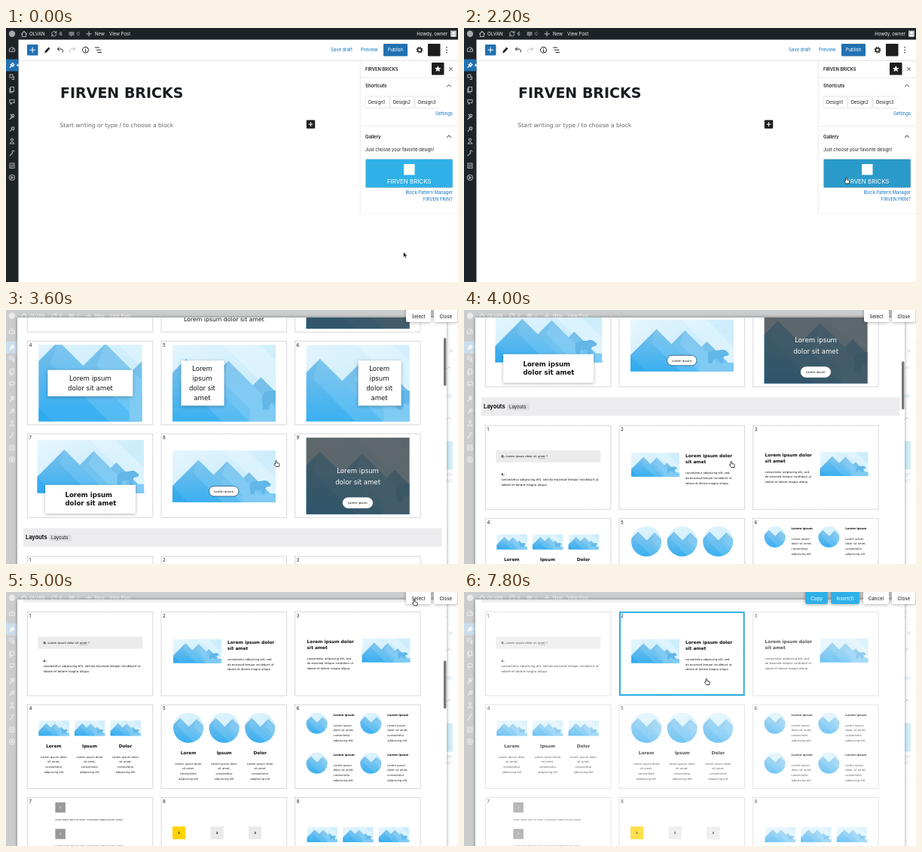
Write an HTML page that moves like this. It is 600 px wide and 338 px high and loops after 8 s.

```html
<!DOCTYPE html>
<html lang="en">
<head>
<meta charset="utf-8">
<title>Block gallery</title>
<style>
html, body { margin: 0; width: 100%; height: 100%; overflow: hidden; background: #fff; }
svg { display: block; }
#stage { width: 100%; height: 100%; }
text { font-family: Inter, sans-serif; white-space: pre; }
.v { font-family: "DejaVu Sans", sans-serif; }
.ic { fill: none; stroke: #1e1e1e; stroke-linecap: round; stroke-linejoin: round; }
.soft { filter: drop-shadow(0 1px 2px rgba(0,0,0,.3)); }
</style>
</head>
<body>
<svg id="stage" viewBox="0 0 600 338">
  <defs>
    <linearGradient id="sky" x1="0" y1="0" x2="1" y2="1">
      <stop offset="0" stop-color="#e6f6fe"/><stop offset=".5" stop-color="#cdedfc"/><stop offset="1" stop-color="#d4effc"/>
    </linearGradient>
    <linearGradient id="near" x1="0" y1="0" x2="0" y2="1">
      <stop offset="0" stop-color="#78bfe9"/><stop offset=".75" stop-color="#3bb0f2"/>
    </linearGradient>
    <linearGradient id="far" x1="0" y1="0" x2="0" y2="1">
      <stop offset="0" stop-color="#78bfe9"/><stop offset=".75" stop-color="#6cc6f6"/>
    </linearGradient>
    <g id="scene">
      <path d="M0 0H142V90H0z" fill="url(#sky)"/>
      <path d="M70 0H104L142 38V71z" fill="#fff" opacity=".25"/>
      <path d="M105 30L165 90H45z" fill="url(#far)"/>
      <path d="M75 15L150 90H0z" fill="url(#far)"/>
      <path d="M75 15L150 90H125L68 33z" fill="#9bd8f8" opacity=".35"/>
      <path d="M36 13L113 90H-41z" fill="url(#near)"/>
      <path d="M36 13L113 90H88L29 31z" fill="#8fd3f8" opacity=".3"/>
      <path d="M0 49L41 90H0z" fill="#1f9fe8" opacity=".35"/>
      <path d="M95 59H142V90H95z" fill="#7fcbf4"/>
      <path d="M107 60L106 51Q106 43 113 42.500L122 42Q127 40 130 42L135 46L134 49L129 50L127 53V60H123L122 54H114L112 60z" fill="#62b7e8"/>
    </g>
    <symbol id="art" viewBox="0 0 142 71" preserveAspectRatio="xMidYMid slice"><use href="#scene"/></symbol>
    <symbol id="close-up" viewBox="19.500 16 86 64" preserveAspectRatio="xMidYMid slice"><use href="#scene"/></symbol>
    <clipPath id="round"><circle cx="55.500" cy="35.500" r="35.500"/></clipPath>
    <symbol id="disc" viewBox="20 0 71 71"><use href="#scene" clip-path="url(#round)"/></symbol>
    <clipPath id="sheet"><path d="M15 10H585V338H15z"/></clipPath>
  </defs>
  <g id="page"></g>
  <g id="modal">
    <path d="M0 0H600V338H0z" fill="#fff" opacity=".77"/>
    <path d="M15 10H585V345H15z" fill="#fff" style="filter:drop-shadow(0 0 2px rgba(0,0,0,.4))"/>
    <g clip-path="url(#sheet)"><g id="list"></g></g>
    <rect id="thumb" x="581" width="3.4" height="64" rx="1.7" fill="#777"/>
    <g id="tools"></g>
  </g>
  <path id="arrow" d="M0 0V7.2L1.7 5.7L2.8 8.3L4.1 7.8L3 5.2H5.2z" fill="#111" stroke="#fff" stroke-width=".6"/>
  <path id="hand" d="M-1 4.300V.8a.85.85 0 0 1 1.700 0V2.900L3.400 3.600Q4.300 3.900 4.300 4.800L3.700 8H-.3L-2.700 4.800Q-2.500 3.600-1 4.400z" fill="#fff" stroke="#111" stroke-width=".8" stroke-linejoin="round"/>
</svg>
<script>
const LOOP = 8000;
const $ = id => document.getElementById(id);
const INK = '#1e1e1e', LINK = '#0a72c4', BLUE = '#2271b1', CYAN = '#2fb1e8';

// Markup helpers
const rect = (x, y, w, h, fill, more = '') =>
  `<rect x="${x}" y="${y}" width="${w}" height="${h}" fill="${fill}" ${more}/>`;
const text = (x, y, s, size, fill = INK, more = '') =>
  `<text x="${x}" y="${y}" font-size="${size}" fill="${fill}" ${more}>${s}</text>`;
const icon = (d, color = INK, w = 1) =>
  `<path class="ic" d="${d}" style="stroke:${color}" stroke-width="${w}"/>`;
const MID = 'text-anchor="middle"', END = 'text-anchor="end"';
const BOLD = 'font-weight="700"', SEMI = 'font-weight="600"', BOLD_MID = BOLD + ' ' + MID;
const verd = (x, y, s, size, fill = '#111', more = '') => text(x, y, s, size, fill, 'class="v" ' + more);
const lines = (x, y, step, rows, size, fill, more) =>
  rows.map((s, i) => verd(x, y + i * step, s, size, fill, more)).join('');
const art = (x, y, w, h, id = 'art') => `<use href="#${id}" x="${x}" y="${y}" width="${w}" height="${h}"/>`;

function buildPage() {
  const gray = '#a7aaad', light = '#f0f0f1';
  const side = [
    'M5 31.5a3.6 3.6 0 1 1 6 0zM8 30l1.5-2.5',
    'M5 62h4v4h-4zM8 68.5h2.5v-4', 'M6 78.5h4.5v6h-4.5zM5 80v6h4',
    'M5 95.5h6v4h-3l-1.5 2v-2H5z', 'M6 115l4 4M9 114.5l2 2l-3 3l-1.5-1.5zM5 121.5l2-2',
    'M5 137.5l3-3M7 133l3 3l1-3l-1.5-1.5z',
    'M6.5 148.5a1.5 1.5 0 1 1 3 0a1.5 1.5 0 1 1-3 0M5 154q3-5 6 0z',
    'M5 170l4-4M9 166a1.5 1.5 0 1 1 2-2', 'M5 180h6v6.5h-6zM7 182v3M9 181.5v3',
    'M4.5 199a3.5 3.5 0 1 1 7 0a3.5 3.5 0 1 1-7 0M7 197.5v3l2.5-1.5z'];
  const bar = rect(0, 0, 600, 15.5, '#1d2327') + rect(0, 15, 16.5, 323, '#1d2327')
    + rect(0, 41.5, 16.5, 16, BLUE) + '<path d="M16.5 47L14 49.5L16.5 52z" fill="#fff"/>'
    + '<circle cx="8" cy="7.8" r="4.2" fill="#a7aaad"/>'
    + icon('M20.5 8L24 4.5L27.5 8M21.5 7.5V11.5H26.5V7.5', gray, 1.1)
    + text(31, 10, 'OLVAN', 6.2, light)
    + icon('M60.5 7.5a3.3 3.3 0 0 1 6-1.5M67 8a3.3 3.3 0 0 1-6 1.5M66.8 4.5V6.5H65M60.8 11V9H62.5', gray)
    + text(71, 10, '6', 6, light)
    + '<path d="M83.5 5H90.5V10H88L86 12V10H83.5z" fill="#787c82"/>' + text(94, 10, '0', 6, gray)
    + icon('M107 7.8H113M110 4.8V10.8', gray, 1.2) + text(118, 10, 'New', 6, light)
    + text(137, 10, 'View Post', 6, light) + text(586, 10, 'Howdy, owner', 6, light, END)
    + rect(590, 3.5, 8, 8, '#c3c4c7') + '<circle cx="594" cy="6.5" r="1.7" fill="#fff"/><path d="M591 11.5q3-5 6 0z" fill="#fff"/>'
    + side.map(d => icon(d, gray, 1.1)).join('')
    + icon('M5 52.5L7 50.5M6 48.5L9 51.5M8.5 46.5L11 49L9 50.5L7.5 48.5z', '#fff', 1.1);

  const gear = '<circle cx="549" cy="29.3" r="2.5" fill="none" stroke="#1e1e1e" stroke-width="1.5"/>'
    + '<circle cx="549" cy="29.3" r="3.8" fill="none" stroke="#1e1e1e" stroke-width="1.2" stroke-dasharray="1.5 1.48"/>';
  const head = rect(16.5, 43, 583.5, .8, '#e0e0e0') + rect(28, 22, 14.5, 14.5, BLUE, 'rx="1"')
    + icon('M32 29.2H38.5M35.2 26V32.5', '#fff')
    + '<path d="M51 33.5L52 30.5L56.5 25.5L58.5 27.3L54 32.3z" fill="#1e1e1e"/>'
    + icon('M68.5 28H73a2.5 2.5 0 0 1 2 4M70.5 25.8L68.3 28L70.5 30.2')
    + icon('M91.5 28H87a2.5 2.5 0 0 0-2 4M89.5 25.8L91.7 28L89.5 30.2', '#bbb')
    + icon('M101.5 29.2a4 4 0 1 1 8 0a4 4 0 1 1-8 0M105.5 29V31.5M105.5 27V27.2')
    + icon('M118.5 26H123.5M120.5 29.2H126M122 32.5H126.5')
    + text(431, 31.4, 'Save draft', 6, LINK) + text(471, 31.4, 'Preview', 6, LINK)
    + rect(501, 21, 32, 16.5, BLUE, 'rx="1"') + text(517, 31.4, 'Publish', 6, '#fff', MID)
    + gear + rect(560, 21, 16.5, 16.5, INK, 'rx="1"')
    + [25.7, 29.2, 32.7].map(y => `<circle cx="585" cy="${y}" r=".8" fill="#1e1e1e"/>`).join('');

  const body = verd(72, 92.5, 'FIRVEN BRICKS', 19, '#191e23', BOLD)
    + verd(71.5, 131.7, 'Start writing or type / to choose a block', 7.6, '#666')
    + rect(398.8, 122.5, 11.4, 11.2, INK, 'rx="1"') + icon('M402 128.1H407M404.5 125.6V130.6', '#fff');

  const tab = (x, n, open) =>
    `<path d="M${x + 32} 91H${x + 2}Q${x} 91 ${x} 93V104.5Q${x} 106.5 ${x + 2} 106.5H${x + 32}${open ? '' : 'z'}" fill="none" stroke="#ddd" stroke-width=".7"/>`
    + text(x + 4, 101, 'Design' + n, 6);
  const panel = rect(469.8, 43.5, .7, 204, '#e2e2e2') + text(477, 56.7, 'FIRVEN BRICKS', 5.8, INK, SEMI)
    + rect(565, 46, 16.5, 16.5, INK, 'rx="1"')
    + '<path d="M573.3 50L574.5 52.9L577.6 53.1L575.2 55.1L576 58.2L573.3 56.5L570.6 58.2L571.4 55.1L569 53.1L572.1 52.9z" fill="#fff"/>'
    + icon('M588.7 52.7L592.3 56.3M592.3 52.7L588.7 56.3', INK, .9)
    + rect(470, 65.6, 130, .7, '#e2e2e2') + text(477, 78.8, 'Shortcuts', 6, INK, SEMI)
    + icon('M585.5 78L588 75.5L590.5 78', INK, .9)
    + tab(477, 1) + tab(509.7, 2) + tab(543, 3, true) + text(593, 115.7, 'Settings', 6, LINK, END)
    + rect(470, 130, 130, .7, '#e6e6e6') + text(477, 146.5, 'Gallery', 6, INK, SEMI)
    + icon('M585.5 145.5L588 143L590.5 145.5', INK, .9)
    + text(477, 164, 'Just choose your favorite design!', 5.8)
    + rect(477.3, 174.5, 115.7, 38, CYAN, 'id="banner" rx="1.5" stroke="#b5c9d2" stroke-width=".8"')
    + rect(528, 181, 14.5, 14.5, '#fff') + text(535.2, 206.6, 'FIRVEN BRICKS', 7.9, '#fff', MID)
    + text(593, 221.2, 'Block Pattern Manager', 5.8, LINK, END) + text(593, 230.2, 'FIRVEN PRINT', 5.8, LINK, END)
    + rect(470, 247, 130, .6, '#ebebeb');
  return rect(0, 0, 600, 338, '#fff') + bar + head + body + panel;
}

// Card contents, relative to each card's corner
const COVER = art(15, 5, 137, 102), WIDE = art(13, 8, 142, 71);
const DARK = COVER + rect(15, 5, 137, 102, '#2d3335', 'opacity=".72"');
const TWO = ['Lorem ipsum', 'dolor sit amet'];
const FOUR = ['Lorem', 'ipsum', 'dolor sit', 'amet'];
const COLUMN = ['Lorem ipsum dolor', 'sit amet,', 'consectetur', 'adipiscing elit'];
const NARROW = ['Lorem ipsum', 'dolor sit amet,', 'consectetur', 'adipiscing elit'];
const BODY = ['consectetur adipiscing elit, sed', 'do eiusmod tempor incididunt ut', 'labore et dolore magna aliqua.'];
const LONG = 'Lorem ipsum dolor sit amet, consectetur adipiscing elit, sed do';
const paper = (x, y, w, h) => rect(x, y, w, h, '#fff', 'class="soft"');
const pill = (y, line) => rect(63.5, y, 39.5, 13.6, '#fff', `rx="6.8" stroke="${line}" stroke-width=".8"`)
  + verd(83.2, y + 8.3, 'Lorem ipsum', 4, '#111', MID);
const feature = (x, y) => lines(x, y, 8, ['Lorem ipsum dolor', 'sit amet'], 5.9, '#111', BOLD)
  + lines(x, y + 22, 6.7, BODY, 3.75);
const trio = (x, y) => ['Lorem', 'Ipsum', 'Dolor'].map((s, i) =>
  verd(x + i * 47.6, y, s, 5.8, '#111', BOLD_MID) + lines(x + i * 47.6, y + 14, 6.7, COLUMN, 3.75, '#222', MID)).join('');
const thumbs = (x, y) => [0, 1, 2].map(i => art(x + i * 47.6, y, 40.5, 20.3)).join('');
const step = (y, n) => rect(37, y, 13.5, 13.5, '#999') + verd(43.7, y + 8.2, n, 4, '#fff', MID)
  + verd(37, y + 23.6, LONG, 2.85);
const person = (x, y) => art(x - 14, y - 14, 28, 28, 'disc') + verd(x + 22, y - 9.5, 'Lorem ipsum', 3.85, '#111', BOLD)
  + lines(x + 22, y + 4, 6.7, NARROW, 3.75, '#222');

const HEADLINES = [
  verd(83.5, 38, 'Lorem ipsum dolor sit amet', 8.2, '#111', MID) + verd(83.5, 54, 'Lorem', 4, '#777', MID)
    + lines(83.5, 70, 7.4, [LONG, 'eiusmod tempor incididunt ut labore et dolore magna aliqua.'], 4.1, '#111', MID),
  WIDE + verd(83.5, 97, 'Lorem ipsum dolor sit amet', 7.75, '#111', MID),
  DARK + lines(83.5, 52, 13, TWO, 8.6, '#fff', MID),
  art(15, 5, 137, 102, 'close-up') + paper(27, 38.5, 113, 35) + lines(83.5, 53, 13, TWO, 8.6, '#111', MID),
  COVER + paper(26.5, 26, 57, 60) + lines(54.5, 40, 13, FOUR, 8.6, '#111', MID),
  COVER + paper(84, 26, 57, 60) + lines(112, 40, 13, FOUR, 8.6, '#111', MID),
  WIDE + paper(23.7, 68, 120, 38) + lines(50, 84, 11, TWO, 8.6, '#111', BOLD),
  art(15, 22, 137, 69) + pill(69.5, '#1f4e7a'),
  DARK + lines(83.5, 52.5, 15, TWO, 8.6, '#fff', MID) + pill(85, '#fff')];

const LAYOUTS = [
  rect(14, 33, 139, 16, '#ebebeb') + verd(21, 42.7, 'Q.', 3.8, '#111', BOLD)
    + verd(27, 42.7, 'Lorem ipsum dolor sit amet ?', 3.8) + rect(70, 43.4, 10, .5, '#888')
    + verd(21, 66.5, 'A.', 3.8, '#111', BOLD)
    + lines(21, 73.5, 6.6, ['consectetur adipiscing elit, sed do eiusmod tempor incididunt ut', BODY[2]], 4),
  art(16, 36, 64, 32) + feature(88, 42.5),
  feature(16, 41) + art(89, 35, 64, 32),
  thumbs(15, 21) + trio(35, 56.5),
  [36, 83.6, 131.2].map(x => art(x - 20, 10.5, 40, 40, 'disc')).join('') + trio(36, 65.5),
  [24.5, 77.5].map(y => person(29, y) + person(100.7, y)).join(''),
  step(6.5, 1) + step(41.7, 2),
  [1, 2, 3].map((n, i) => rect(15 + i * 50.5, 38.5, 17.3, 17, i ? '#eaeaea' : '#ffd200')
    + verd(23.6 + i * 50.5, 48.5, n, 4, '#111', BOLD_MID)).join(''),
  thumbs(16, 39)];

const group = (name, top, cards, id) => {
  const [pillX, pillW] = name === 'Layouts' ? [57, 30] : [64, 35];
  return rect(23, top, 555.5, 24.5, '#ececee') + text(26, top + 14.7, name, 7.4, '#111', BOLD)
    + rect(pillX, top + 8.5, pillW, 8.6, '#dcdcde', 'rx="3"') + text(pillX + 3, top + 15, name, 6.1)
    + cards.map((c, i) =>
      `<g class="card" id="${id}${i + 1}" transform="translate(${28.4 + i % 3 * 177.6} ${top + 37.5 + (i / 3 | 0) * 123.5})">`
      + rect(0, 0, 166.5, 111.5, '#fff', 'stroke="#aaa" stroke-width=".7" stroke-dasharray="1.4 .8"')
      + c + text(2, 7.4, i + 1, 6.2) + '</g>').join('');
};

const button = (id, x, w, label, blue) => `<g id="${id}">`
  + rect(x, -5, w, 21, blue ? CYAN : '#fff', 'rx="2.5" class="soft"')
  + text(x + w / 2, 10.5, label, 6.2, blue ? '#fff' : '#111', MID) + '</g>';

$('page').innerHTML = buildPage();
$('list').innerHTML = group('Headlines', 25, HEADLINES, 'h') + group('Layouts', 435, LAYOUTS, 'l')
  + `<g id="picked">${rect(207, 473, 164.6, 110, 'none', `stroke="${CYAN}" stroke-width="2"`)}</g>`;
$('tools').innerHTML = button('copy', 453, 30, 'Copy', true) + button('insert', 487, 38, 'Insert(1)', true)
  + button('select', 531, 33, 'Select') + button('cancel', 530, 34, 'Cancel') + button('close', 568, 31.5, 'Close');
const cards = [...document.querySelectorAll('.card')];

// Motion
const ramp = (t, a, b) => Math.min(1, Math.max(0, (t - a) / (b - a)));
const ease = (t, a, b) => { const u = ramp(t, a, b); return u * u * (3 - 2 * u); };
const show = (id, on) => $(id).style.display = on ? '' : 'none';
// Pointer moves: start, end, x, y
const MOVES = [[200, 1000, 507.5, 199], [2450, 2980, 365.5, 198.5], [3000, 4000, 355, 201.5],
  [4450, 4980, 542, 10], [5500, 6000, 551, 10.5], [6300, 7100, 322, 115.5]];

function draw(t) {
  let x = 527.5, y = 298;
  for (const [a, b, nx, ny] of MOVES) {
    const k = ease(t, a, b);
    x += (nx - x) * k;
    y += (ny - y) * k;
  }
  const overBanner = y < 213;
  show('arrow', !overBanner);
  show('hand', overBanner);
  for (const id of ['arrow', 'hand']) $(id).setAttribute('transform', `translate(${x} ${y})`);
  $('banner').setAttribute('fill', overBanner && t < 2400 ? '#2a9aca' : CYAN);

  const open = ramp(t, 2350, 2600);
  show('modal', open > 0);
  $('modal').style.opacity = open;
  const scroll = 446 * ease(t, 3030, 4530);
  $('list').setAttribute('transform', `translate(0 ${-scroll})`);
  $('thumb').setAttribute('y', 11 + scroll * .18);
  $('thumb').style.opacity = ramp(t, 3030, 3150) * (1 - ramp(t, 5100, 5300));

  const picking = t >= 5300, picked = t >= 7300;
  const dim = 1 - .3 * ramp(t, 5300, 5500);
  for (const c of cards) c.style.opacity = dim;
  if (!picking) $('h6').style.opacity = 1 - .35 * ramp(t, 2650, 2800) * (1 - ramp(t, 3000, 3200));
  if (picked) $('l2').style.opacity = dim + .3 * ramp(t, 7300, 7500);
  show('picked', picked);
  show('copy', picked);
  show('insert', picked);
  show('select', !picking);
  show('cancel', picking);
}

const begin = performance.now();
function tick() {
  draw((performance.now() - begin) % LOOP);
  requestAnimationFrame(tick);
}
draw(0);
requestAnimationFrame(tick);
</script>
</body>
</html>
```
